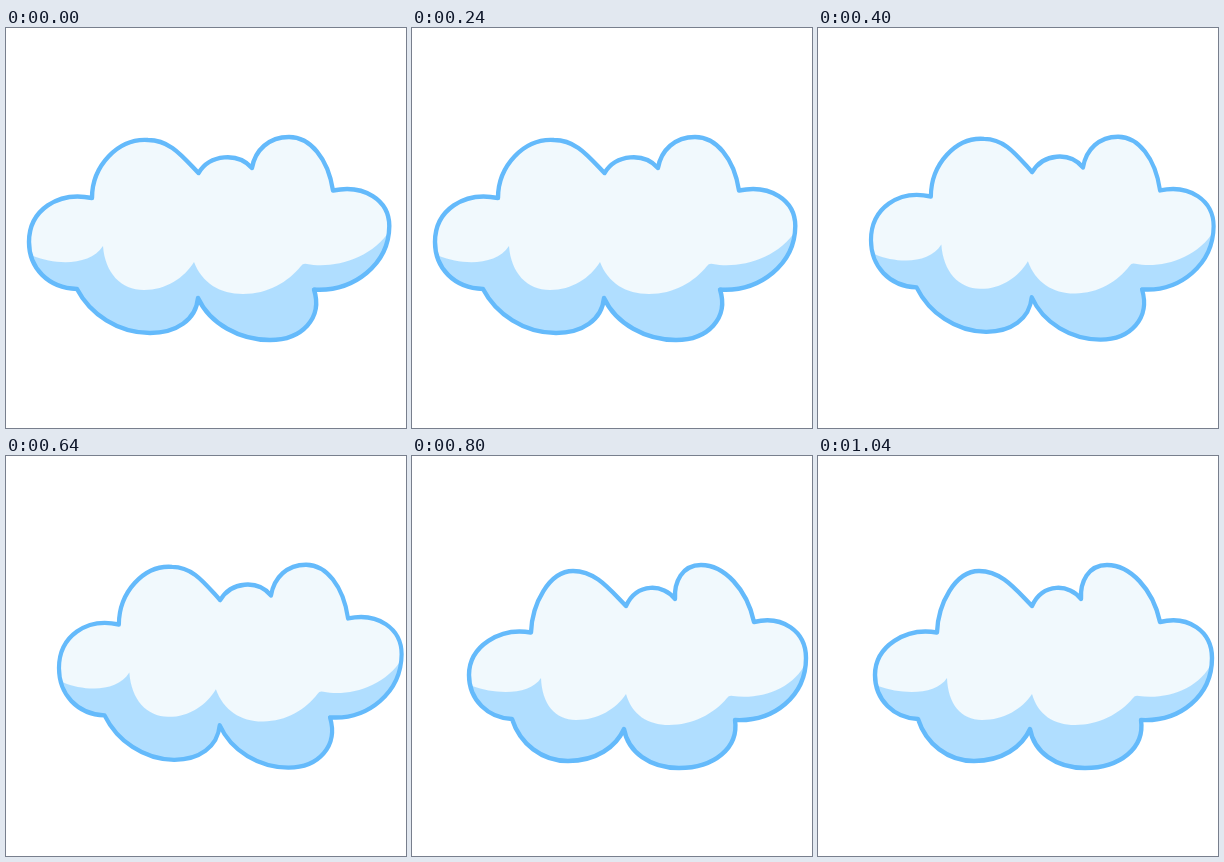
An HTML page for the animation above (1200 ms loop, 400x400 px).

```html
<!DOCTYPE html>
<html lang="en">
<head>
<meta charset="utf-8">
<title>Cloud</title>
<style>
  html, body { margin: 0; width: 100%; height: 100%; overflow: hidden; background: #fff; }
  svg { display: block; width: 100%; height: 100%; }
  .pose { visibility: hidden; }
  .shade { fill: #b0deff; }
  .light { fill: #f1f9fd; }
  .line {
    fill: none; stroke: #64bafb; stroke-width: 4.4;
    stroke-linejoin: round; vector-effect: non-scaling-stroke;
  }
</style>
</head>
<body>
<svg viewBox="0 0 400 400">
  <defs>
    <path id="wide" d="M86 170C52 163 23 182 23 214C23 240 42 260 71 261
      C84 286 112 305 144 305C170 305 190 292 192 270
      C204 296 234 312 264 312C296 312 317 290 308 261.5
      C348 264 383 236 383.3 198C383.3 172 358 156 327 162.5
      C322 130 304 109 283 109C263 109 249 122 246 140
      C232 124 204 126 192.5 145C176 128 164 112 142 112C112 110 86 138 86 170Z"/>
    <path id="leaning" d="M119 176.5C88 171 57 190 57 219C57 244 76 262 100 263
      C108 288 130 305 156 305C184 305 204 291 212 273
      C216 296 238 312 267 312C302 312 327 292 323 264
      C362 266 394 240 394 202C394 175 370 159 342 166
      C335 133 312 109 289 109C270 109 262 126 263 143
      C252 128 225 126 214 150C198 134 184 115 161 115C137 115 120 148 119 176.5Z"/>
    <clipPath id="wide-clip"><use href="#wide"/></clipPath>
    <clipPath id="leaning-clip"><use href="#leaning"/></clipPath>

    <g id="wide-cloud">
      <use href="#wide" class="shade"/>
      <path class="light" clip-path="url(#wide-clip)" d="M0 215L27 228C50 237 84 238 97 218
        C99 245 115 262 138 262C160 262 178 250 188 234C196 255 214 266 237 266
        C262 266 282 254 295 238Q297 235 301 236C327 241 366 231 384 202V0H0Z"/>
      <use href="#wide" class="line"/>
    </g>
    <g id="leaning-cloud">
      <use href="#leaning" class="shade"/>
      <path class="light" clip-path="url(#leaning-clip)" d="M0 205L60 230C85 239 118 239 129 222
        C130 248 143 264 164 264C186 264 204 253 214 238C220 259 236 269 257 269
        C280 269 302 258 315 242Q317 239 321 240C348 244 382 233 394 206V0H0Z"/>
      <use href="#leaning" class="line"/>
    </g>
  </defs>

  <use class="pose" href="#wide-cloud"/>
  <use class="pose" href="#wide-cloud" transform="matrix(.951 .006 0 1 31.1 -2)"/>
  <use class="pose" href="#leaning-cloud"/>
</svg>
<script>
  const HOLD = 400;
  const poses = document.querySelectorAll('.pose');
  const steps = [
    { visibility: 'visible', offset: 0, easing: 'step-end' },
    { visibility: 'hidden', offset: 1 / poses.length },
    { visibility: 'hidden', offset: 1 }
  ];

  poses.forEach((pose, i) => pose.animate(steps, {
    duration: HOLD * poses.length,
    delay: HOLD * i,
    iterations: Infinity
  }));
</script>
</body>
</html>
```
